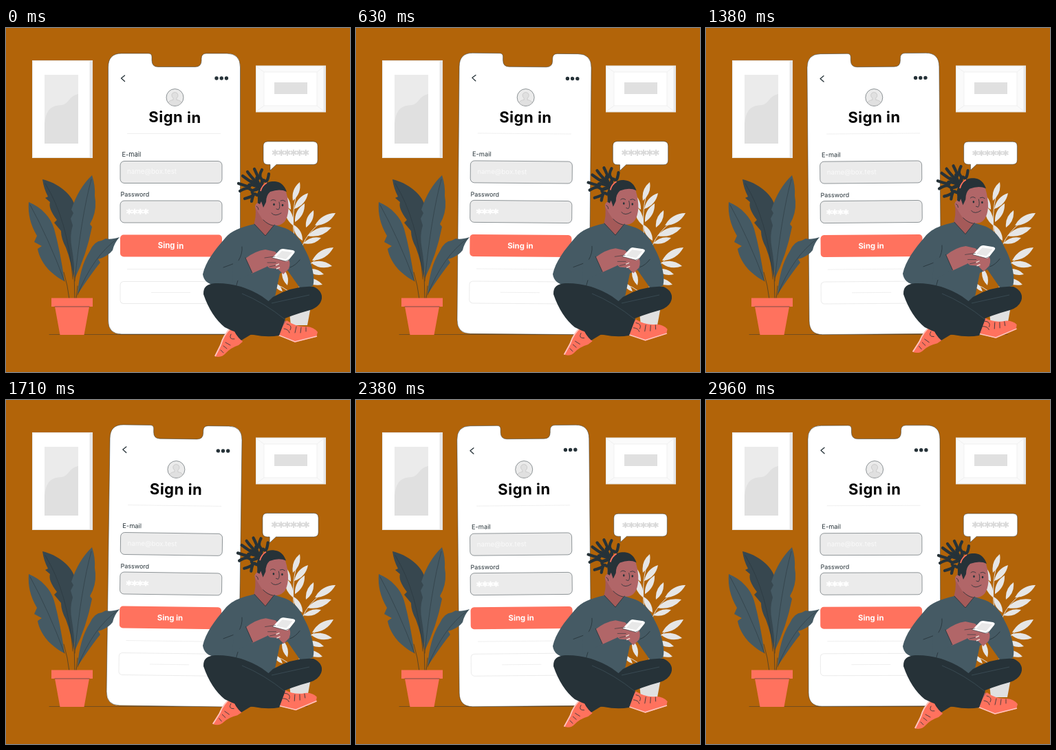
These frames come from a looping animation (500x500 px, 3000 ms). An HTML page:

```html
<!DOCTYPE html>
<html lang="en">
<head>
<meta charset="utf-8">
<title>Sign in</title>
<style>
html, body { margin: 0; width: 100%; height: 100%; overflow: hidden; background: #b26409; }
svg { display: block; width: 100vw; height: 100vh; }
text { font-family: Inter, "Open Sans", sans-serif; }
.stars { font: bold 17px "DejaVu Sans", sans-serif; stroke-width: .7; }
.line { fill: none; stroke: #263238; stroke-width: .8; stroke-linecap: round; stroke-linejoin: round; }
.ink { stroke: #263238; stroke-width: .5; }
.rule { stroke: #e8e8e8; stroke-width: .7; }
.slate { fill: #455a64; }
.dark { fill: #263238; }
.coral { fill: #ff725e; }
.skin { fill: #b16668; }
.face { fill: #a55a59; }
</style>
</head>
<body>
<svg viewBox="0 0 500 500">
  <path class="line" style="stroke-width:.45" d="M63 445.500H438"/>

  <!-- wall pictures -->
  <path fill="#e6e6e6" d="M38 47H126V189H38z"/>
  <path fill="#fff" d="M39 48H121.500V188H39z"/>
  <path fill="#ebebeb" d="M56 68H105V168H56z"/>
  <path fill="#e0e0e0" d="M56 168V139Q58 114 76 112.500C94 112 88 100 105 96V168z"/>
  <path fill="#e6e6e6" d="M363 54.500H465V122.500H363z"/>
  <path fill="#fafafa" d="M364 55.500H461.500V121.500H364z"/>
  <path fill="#fff" d="M375 64H452V113H375z"/>
  <path fill="none" stroke="#ebebeb" stroke-width=".7" d="M364 56 375 64H452V113H375V64M452 64 462 56M452 113 462 121M375 113 364 121"/>
  <path fill="#e0e0e0" d="M390 79H438V96H390z"/>

  <!-- phone -->
  <g id="phone">
    <path class="ink" fill="#fff" d="M168 37H207q5 0 5 5v5q0 9.500 9 9.500H275q9 0 9-9v-3q0-7.500 7-7.500H321q19.500 0 19.500 20V425q0 20-20 20H168q-19.500 0-19.500-20V57q0-20 19.500-20z"/>
    <path class="line" style="stroke-width:1.300" d="M172.500 69 167.500 73 172.500 77.500"/>
    <g class="dark"><circle cx="306" cy="73" r="2.700"/><circle cx="313.200" cy="73" r="2.700"/><circle cx="320.400" cy="73" r="2.700"/></g>
    <circle class="ink" cx="245.500" cy="101" r="12.500" fill="#ebebeb"/>
    <path fill="#e0e0e0" stroke="#aaa" stroke-width=".4" d="M236 109Q237 105 243 104.500V102Q240 99 241 96.500Q242 93.500 245.500 93.500T250 97Q250.500 100 248 102V104.500Q254 105 255 109Q251 113 245.500 113T236 109z"/>
    <text x="245.500" y="137.500" text-anchor="middle" font-size="22" font-weight="700" letter-spacing=".5">Sign in</text>
    <path class="rule" d="M176 153.500H312M176 350.500H312M211 384.500H268"/>
    <g fill="#263238"><text x="168.500" y="187" font-size="9.300">E-mail</text><text x="166.500" y="245.500" font-size="9">Password</text></g>
    <g class="ink" fill="#ebebeb"><rect x="166" y="193.500" width="148" height="32" rx="6"/><rect x="166" y="251" width="148" height="32" rx="6"/></g>
    <text x="176" y="212.500" font-size="9.800" fill="#fafafa">name@box.test</text>
    <text class="stars" x="175" y="275" style="font-size:15.500px" fill="#fff" stroke="#fff">****</text>
    <rect class="coral" x="166" y="300.500" width="148" height="32" rx="5"/>
    <text x="239.500" y="320.500" text-anchor="middle" font-size="11.300" font-weight="700" fill="#fff">Sing in</text>
    <rect x="166" y="368.500" width="148" height="32" rx="5" fill="none" stroke="#ebebeb"/>
  </g>

  <!-- potted plant -->
  <path class="line" style="stroke-width:.6" d="M84 355Q90 375 92 394M99 355 100 394M104 375 102 394"/>
  <path fill="#37474f" d="M53 220C75 225 98 242 101 262Q104 305 98 364Q95 340 87 319Q80 306 80 295L70 283 74 279Q61 262 64 253L57 247 61 245Q55 234 53 220z"/>
  <path class="slate" d="M125 214Q130 229 129 244L130 252Q131 270 122 285L125 289Q117 330 100 364Q99 340 96 322Q92 302 97 287L94 277 98 269 95 264Q105 233 125 214z"/>
  <path class="slate" d="M33 253C52 261 65 275 70 292Q79 325 85 368Q76 364 66 355C54 345 47 329 46 321L52 317 41 311 45 302Q31 279 33 253z"/>
  <path class="slate" d="M165 304Q157 313 155 323Q148 332 134 336L137 341Q126 354 104 387Q107 347 122 324Q128 310 139 309L145 306Q152 308 165 304z"/>
  <path class="line" style="stroke-width:.5" d="M57 226Q90 279 97 365M124 220Q109 275 100 368M35 257Q62 306 85 368M162 306Q126 332 104 388"/>
  <path class="coral" d="M66 392.500H126V405H121L113.500 446H78.500L71 405H66z"/>
  <path class="line" style="stroke-width:.6" d="M71 405H121"/>

  <!-- pale plant -->
  <path fill="#e0e0e0" d="M411 405H443L438 432H414z"/>
  <g id="sprig"></g>

  <!-- man -->
  <g id="upper">
    <g id="head">
      <g id="dreads" fill="none" stroke="#263238" stroke-width="4.200" stroke-linecap="round" stroke-linejoin="round"></g>
      <path class="face" d="M362 258Q365 275 358 292L377 307 392 296 388 280z"/>
      <path class="skin" d="M366 248C372 230 402 227 407 238Q411 252 410.500 264C409 280 403 286 394 287Q382 288 372 277L364 264z"/>
      <path class="dark" d="M366 248C364 229 380 222 391 223Q403 224 408 238Q398 233 384 238Q378 243 378 253L374 261 371 252 367 260Q365 254 366 248z"/>
      <path class="skin" d="M370 257Q364 251 362 259Q363 267 371 267z"/>
      <path d="M370 237Q372 229 379 225" fill="none" stroke="#ff725e" stroke-width="1.800"/>
      <path class="line" d="M385 251Q388 248 392 251M399 251Q403 249 406 252M397 253Q399 261 396 264L393 263M386 269Q391 275 400 269M364 259Q367 260 367 264M374 279Q381 286 388 287"/>
      <ellipse class="dark" cx="389.500" cy="256.500" rx="1.300" ry="1.700"/>
      <ellipse class="dark" cx="402" cy="257.500" rx="1.300" ry="1.700"/>
    </g>
    <path class="slate" d="M361 285C340 290 328 294 318 306C303 323 290 340 286 358Q288 372 305 374L312 402H388L392 386 398 357 409 352 428 379Q438 378 446 375C450 366 445 340 434 321Q424 298 406 291L390 286 377 302z"/>
    <path class="line" d="M361 285 377 302 390 286M343 338 316 348M337 367 334 377M338 338Q344 328 343 318M413 348Q421 345 427 337"/>
    <g id="hands">
      <path class="skin" d="M348 335Q362 324 377 322L391 325 397 331 386 337 379 347 357 357z"/>
      <path class="skin" d="M386 337Q390 332 398 335L409 334Q415 340 411 350L403 358 395 350 383 349 377 344z"/>
      <path fill="#fff" d="M387 334 398 322.500Q400 320.500 403 321L417 323Q421 324 419 327L411 337Q409 340 406 339z"/>
      <path fill="#e8e8e8" d="M392 333 401 324 416 326 407 336z"/>
      <path class="line" style="stroke-width:.6" d="M387 334 406 339 411 337M376 334 391 332M380 341 392 341M383 347 397 344"/>
      <path d="M392 345 397 343M393 350 398 348" stroke="#f3d9d3" stroke-width="1.500"/>
      <path class="slate" d="M330 342 348 334 358 356 329 371z"/>
      <path class="line" d="M348 334 358 356"/>
    </g>
  </g>
  <g id="footR">
    <path class="skin" d="M402 424 413 429 407 444 396 444z"/>
    <path class="coral" d="M408 425Q422 435 437 434Q448 435 453 442L451 449 420 457 395 446 400 437z"/>
    <path d="M395 446 420 456 452 448" fill="none" stroke="#ffc7bf" stroke-width="1.500"/>
    <path class="line" d="M408 430Q417 432 413 439M422 434 420 443M429 435 428 443M436 435 436 441M404 437Q411 438 412 443"/>
  </g>
  <g id="footL">
    <path class="skin" d="M326 435 337 435 347 451 335 456z"/>
    <path class="coral" d="M327 435 335 442 344 456 338 461Q326 465 319 473Q313 480 303 477L311 461Q317 444 327 435z"/>
    <path d="M327 436Q316 446 312 461L304 477" fill="none" stroke="#ffc7bf" stroke-width="1.800"/>
    <path class="line" d="M327 445Q323 453 332 452M319 457 326 461M316 462 321 466M312 468 316 472"/>
  </g>
  <path class="dark" d="M388 391Q418 374 447 376Q460 382 459 393Q457 405 442 410Q390 424 342 454Q333 446 329 434L371 407z"/>
  <path class="dark" d="M287 387Q286 372 304 371Q340 370 372 390Q390 402 406 423L397 447Q380 450 360 446Q338 446 318 435Q298 419 287 387z"/>
  <path d="M343 386Q375 399 406 424M386 400 441 388" fill="none" stroke="#455a64" stroke-width=".6"/>

  <!-- speech bubble -->
  <g id="bubble">
    <path class="ink" fill="#fff" d="M380.500 165H446.500q6.500 0 6.500 6.500V192q0 6.500-6.500 6.500H393L384 207V198.500H380.500q-6.500 0-6.500-6.500V171.500q0-6.500 6.500-6.500z"/>
    <text class="stars" x="413.500" y="190" text-anchor="middle" fill="#d9d9d9" stroke="#d9d9d9">******</text>
  </g>
</svg>
<script>
const $ = id => document.getElementById(id);

// A leaf from base to tip, bulging by a share of its length.
function leaf([x, y, u, v], k = .29) {
  const mx = (x + u) / 2, my = (y + v) / 2, dx = (v - y) * k, dy = (u - x) * k;
  return `M${x} ${y}Q${mx + dx} ${my - dy} ${u} ${v}Q${mx - dx} ${my + dy} ${x} ${y}`;
}
const leaves = [
  [417, 251, 427, 224], [414, 264, 401, 239], [419, 263, 439, 240], [420, 282, 434, 255],
  [417, 287, 406, 258], [436, 290, 447, 265], [449, 287, 479, 269], [438, 302, 473, 290],
  [432, 313, 458, 305], [431, 309, 418, 286], [445, 338, 476, 319], [443, 341, 474, 346],
  [437, 351, 462, 358], [432, 364, 460, 373], [409, 374, 402, 349], [402, 383, 388, 369]
];
$("sprig").innerHTML =
  `<path d="M424 235Q411 275 424 335T426 410M470 275Q424 300 425 350M468 325Q428 345 425 385M390 372Q415 380 425 400" fill="none" stroke="#e0e0e0"/>` +
  `<path d="${leaves.map(l => leaf(l)).join("")}" fill="#e6e6e6"/>`;

const tips = [[338, 226], [340, 237], [347, 248], [357, 252], [344, 215], [351, 209], [361, 205], [372, 206], [382, 212]];
$("dreads").innerHTML = tips.map(([x, y], i) => {
  const mx = (x + 370) / 2, my = (y + 232) / 2, b = i % 2 ? 4 : -4;
  return `<path d="M370 232Q${mx + b} ${my + b} ${mx} ${my}T${x} ${y}"/>`;
}).join("");

const set = (id, value) => $(id).setAttribute("transform", value);

function draw(now) {
  const turn = now % 3000 / 3000 * 2 * Math.PI;
  const sway = Math.sin(2 * turn), lift = (1 - Math.cos(turn)) / 2;
  const size = 1 + .036 * sway, tall = 1 + .026 * lift;
  set("phone", `rotate(${sway} 245 243)`);
  set("bubble", `translate(413.5 182) scale(${size}) translate(-413.5 -182)`);
  set("upper", `translate(0 ${395 * (1 - tall)}) scale(1 ${tall})`);
  set("head", `rotate(${-lift} 372 292)`);
  set("hands", `translate(${.6 * lift} ${-3 * lift})`);
  set("footL", `translate(0 ${-3 * lift}) rotate(${6 * lift} 336 444)`);
  set("footR", `translate(${-2 * lift} ${-3 * lift}) rotate(${-9 * lift} 402 434)`);
  requestAnimationFrame(draw);
}
requestAnimationFrame(draw);
</script>
</body>
</html>
```
